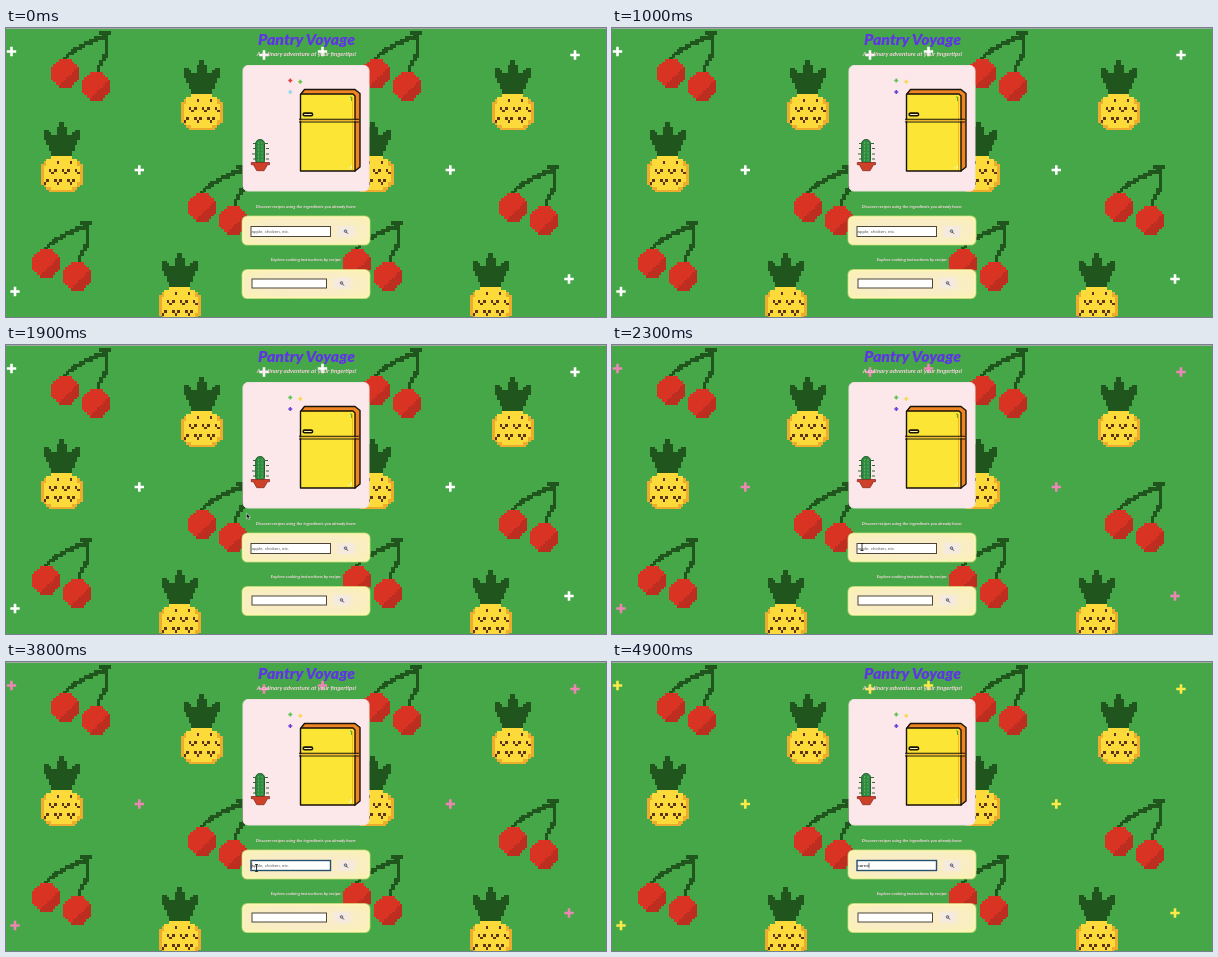
An HTML page with a canvas for the animation above (5000 ms loop, 600x289 px).

```html
<!DOCTYPE html>
<html lang="en">
<head>
<meta charset="utf-8">
<title>Pantry Voyage</title>
<style>
  html, body { margin: 0; width: 100%; height: 100%; overflow: hidden; background: #45a747; }
  canvas, svg { position: absolute; left: 0; top: 0; width: 100%; height: 100%; }
  .script { font-family: Lato, cursive; font-style: italic; font-weight: 700; text-anchor: middle; fill: #f8d3de; }
  .field { font: 4.4px "Liberation Sans", sans-serif; fill: #555; }
</style>
</head>
<body>
<canvas id="pattern" width="600" height="289"></canvas>
<svg viewBox="0 0 600 289" preserveAspectRatio="none">
  <defs>
    <radialGradient id="cream" cx=".5" cy=".5" r=".6">
      <stop offset="0" stop-color="#faeccb"/>
      <stop offset=".7" stop-color="#f9edc4"/>
      <stop offset="1" stop-color="#faf0b8"/>
    </radialGradient>
    <g id="panel">
      <rect x="235.5" y="-.5" width="129" height="30" rx="5.5" fill="#d5e27c" opacity=".7"/>
      <rect x="237" y="1" width="126" height="27" rx="4.5" fill="url(#cream)" stroke="#fdf6b6" stroke-width="1.5"/>
    </g>
    <g id="search">
      <rect x="-8.5" y="-5.5" width="17" height="11" rx="2" fill="#f4ebde"/>
      <path d="M.3 .5l1.6 1.7" stroke="#50394d"/>
      <circle cx="-.5" cy="-.4" r="1.3" fill="#a9b8dc" stroke="#4d4264" stroke-width=".7"/>
    </g>
  </defs>

  <rect width="600" height="1" fill="#a3aaa3"/>
  <path id="pluses"/>

  <text class="script" x="300.5" y="17" font-size="15.8" style="font-weight:900;fill:#5f35e6">Pantry Voyage</text>
  <text class="script" x="300.5" y="28" font-size="6.1">A culinary adventure at your fingertips!</text>

  <rect x="237" y="37.5" width="126" height="125.5" rx="5" fill="#fce7eb" stroke="#efe3df" stroke-width="1"/>
  <g id="sparks"></g>

  <g id="cactus">
    <path d="M247 115.5h3M259 115.5h3M247 120.5h3M260 120.5h3M246 126h3M260 126h3M247 131h3M260 131h3" stroke="#2c6b35" stroke-width="1.1"/>
    <rect x="249.7" y="111.5" width="8.8" height="25" rx="4.2" fill="#2f8a42" stroke="#1e5a2b"/>
    <path d="M252.6 114v20M256 114v20" stroke="#58b45c" stroke-dasharray="2 1.4"/>
    <path d="M245.3 134.5H263.5V136.7H261.5L258 142.7H250.8L247.4 136.7H245.3z" fill="#cf4029" stroke="#8b2c20" stroke-width=".8"/>
  </g>

  <g id="fridge" stroke="#17120a" stroke-width="1.4" stroke-linejoin="round">
    <path d="M294.5 66.5l4-5H349l5 4V139l-5 4z" fill="#ee8424"/>
    <path d="M294.5 67q0-1 1-1H347l2 2V143H294.5z" fill="#fde535"/>
    <path d="M346.5 69V142" stroke="#f6b52a" stroke-width="1"/>
    <path d="M293 91.2H353M293 94H353" stroke-width="1.1"/>
    <path d="M294 92.6H353" stroke="#e9a52d" stroke-width=".8"/>
    <rect x="297.2" y="85.1" width="9.4" height="2.6" rx="1.3" fill="#fff3b0" stroke-width="1.6"/>
    <path d="M344 69h1.5v4" fill="none" stroke="#5aa640" stroke-width="1"/>
    <path d="M345.5 137v3h-3" fill="none" stroke="#fff7a9" stroke-width="1"/>
  </g>

  <text class="script" x="300" y="179.5" font-size="4.3">Discover recipes using the ingredients you already have:</text>
  <use href="#panel" y="188"/>
  <use href="#search" x="340" y="203.5"/>
  <rect id="box" x="245" y="198.5" width="79.5" height="10" fill="#fff"/>
  <text id="typed" class="field" x="245.6" y="205"></text>
  <path id="caret" stroke="#222" stroke-width=".6"/>

  <text class="script" x="300" y="233" font-size="4.4">Explore cooking instructions by recipe:</text>
  <use href="#panel" y="241.5"/>
  <use href="#search" x="336" y="255.3"/>
  <rect x="246" y="251" width="74.5" height="9" fill="#fff" stroke="#4d4738" stroke-width="1"/>

  <path id="arrow" d="M0 0V5.6L1.4 4.4L2.4 6.6L3.4 6.1L2.5 4H4.2z" fill="#111" stroke="#fff" stroke-width=".5"/>
  <path id="beam" d="M-1.4 -3.5H1.4M0 -3.5V3.5M-1.4 3.5H1.4" fill="none" stroke="#222" stroke-width=".9"/>
</svg>
<script>
const $ = id => document.getElementById(id);
const ctx = $('pattern').getContext('2d');
const TILE = 311, CELL = 2.6, LOOP = 5000;

const cell = (x, y, c, r, color, size = 1) => {
  const px = Math.round(x + c * CELL), py = Math.round(y + r * CELL);
  ctx.fillStyle = color;
  ctx.fillRect(px, py, Math.round(x + (c + size) * CELL) - px, Math.round(y + (r + size) * CELL) - py);
};

// Fills every grid cell for which pick() returns a colour.
function raster(x, y, cols, rows, pick) {
  for (let r = 0; r < rows; r++)
    for (let c = 0; c < cols; c++) {
      const color = pick(c, r, (c + .5) * CELL, (r + .5) * CELL);
      if (color) cell(x, y, c, r, color);
    }
}

const crown = new Path2D('M20.8 -3L27 12L30 13L40 5L38 18L33 28L29 37H12.5L8.5 28L3.5 18L1.5 5L11.5 13L14.5 12Z');

function pineapple(x, y) {
  raster(x, y, 16, 14, (c, r, px, py) =>
    ctx.isPointInPath(crown, px, py) && '#20551d');
  raster(x, y + 34, 16, 15, (c, r, px, py) => {
    const d = Math.abs((px - 20.8) / 21) ** 2.6 + Math.abs((py - 18.6) / 18.8) ** 2.6;
    if (d > 1) return;
    if (r > 1 && r < 12 && d < .75) {
      const k = (c + (r >> 2) % 2 * 2) % 5;
      if (r % 4 === 1 && k % 2 === 0 && k < 4 || r % 4 === 2 && k === 1) return '#5b3515';
    }
    if (d > .65 && (r > 8 || c < 2 || c > 13)) return '#eeac2e';
    return '#fcda3a';
  });
}

function stem(x, y, pts, color) {
  for (let i = 1; i < pts.length; i++) {
    const [ax, ay] = pts[i - 1], [bx, by] = pts[i];
    const n = Math.ceil(Math.hypot(bx - ax, by - ay));
    for (let k = 0; k <= n; k++) {
      const c = Math.floor((ax + (bx - ax) * k / n) / CELL);
      const r = Math.floor((ay + (by - ay) * k / n) / CELL);
      cell(x, y, c, r, color, 1.4);
    }
  }
}

function ball(x, y) {
  const mid = 5.5 * CELL;
  raster(x - mid, y - mid, 11, 11, (c, r, px, py) => {
    const dx = px - mid, dy = py - mid;
    if (Math.hypot(dx, dy) > 14.4) return;
    return dx + dy > 7 ? '#bd2d20' : '#d93423';
  });
}

function cherries(x, y) {
  const green = '#20561e';
  stem(x, y, [[53, 5], [36, 12], [25, 18], [17, 24], [14, 29]], green);
  stem(x, y, [[57, 2], [57, 23], [52, 28], [49, 34], [47, 42]], green);
  stem(x, y, [[50, 2], [58, 2]], green);
  ball(x + 15, y + 42.3);
  ball(x + 46, y + 55.3);
}

ctx.fillStyle = '#45a747';
ctx.fillRect(0, 0, 600, 289);
for (const x of [0, TILE]) {
  for (const [px, py] of [[175, 32], [35, 94], [153, 225]]) pineapple(x + px, py);
  for (const [px, py] of [[44, 3], [181, 137], [25, 193]]) cherries(x + px, py);
}

const plus = (x, y, a, w) =>
  `M${x - w} ${y - a}h${2 * w}v${a - w}h${a - w}v${2 * w}h${w - a}v${a - w}h${-2 * w}v${w - a}h${w - a}v${-2 * w}h${a - w}z`;

$('pluses').setAttribute('d', [0, TILE].map(x =>
  [[5.5, 23.5], [133.3, 142], [9, 263.5], [258, 27], [252, 251]]
    .map(([px, py]) => plus(x + px, py, 4.7, 1.3)).join('')).join(''));

$('sparks').innerHTML = [[284.3, 52.5], [294.3, 53.8], [284.3, 64]]
  .map(([x, y]) => `<path d="${plus(x, y, 2, .8)}"/>`).join('');
const sparks = [...$('sparks').children];
const SPARKS = [['#e23b3b', '#5fc83f', '#8fd8ee'], ['#59c54f', '#f7d94a', '#6a3fd6']];

const PATH = [[1200, 194, -8], [1500, 221, 100], [2100, 250, 202], [2300, 250, 202], [2600, 250.5, 206], [LOOP, 250.5, 206]];
const WORD = 'carrot', FOCUS = 2700, TYPE = 4000, KEY = 150;

function pointer(t) {
  const i = PATH.findIndex(p => p[0] > t);
  if (i < 1) return null;
  const [ta, xa, ya] = PATH[i - 1], [tb, xb, yb] = PATH[i];
  const k = (t - ta) / (tb - ta);
  return [xa + (xb - xa) * k, ya + (yb - ya) * k];
}

const show = (el, on) => el.setAttribute('visibility', on ? 'visible' : 'hidden');

function draw(t) {
  $('pluses').setAttribute('fill', t < 2000 ? '#fff' : t < 4400 ? '#ee86b5' : '#fbea48');

  const set = SPARKS[(t + 600) % 3000 < 1300 ? 0 : 1];
  sparks.forEach((s, i) => s.setAttribute('fill', set[i]));

  const focus = t >= FOCUS;
  $('box').setAttribute('stroke', focus ? '#27506f' : '#4d4738');
  $('box').setAttribute('stroke-width', focus ? 1.4 : 1);

  const n = Math.max(0, Math.min(WORD.length, Math.floor((t - TYPE) / KEY) + 1));
  const label = $('typed');
  label.textContent = n ? WORD.slice(0, n) : 'apple, chicken, etc.';
  label.style.fill = n ? '#111' : '#555';
  const cx = 245.8 + (n ? label.getComputedTextLength() : 0);
  $('caret').setAttribute('d', `M${cx} 200.8v5.4`);
  show($('caret'), focus && (n > 0 || (t - FOCUS) % 1000 < 500));

  const p = n ? null : pointer(t);
  const inside = p && p[1] > 198;
  show($('arrow'), p && !inside);
  show($('beam'), inside);
  if (p) (inside ? $('beam') : $('arrow')).setAttribute('transform', `translate(${p[0]} ${p[1]})`);
}

const start = performance.now();
function tick() {
  draw((performance.now() - start) % LOOP);
  requestAnimationFrame(tick);
}
tick();
</script>
</body>
</html>
```
